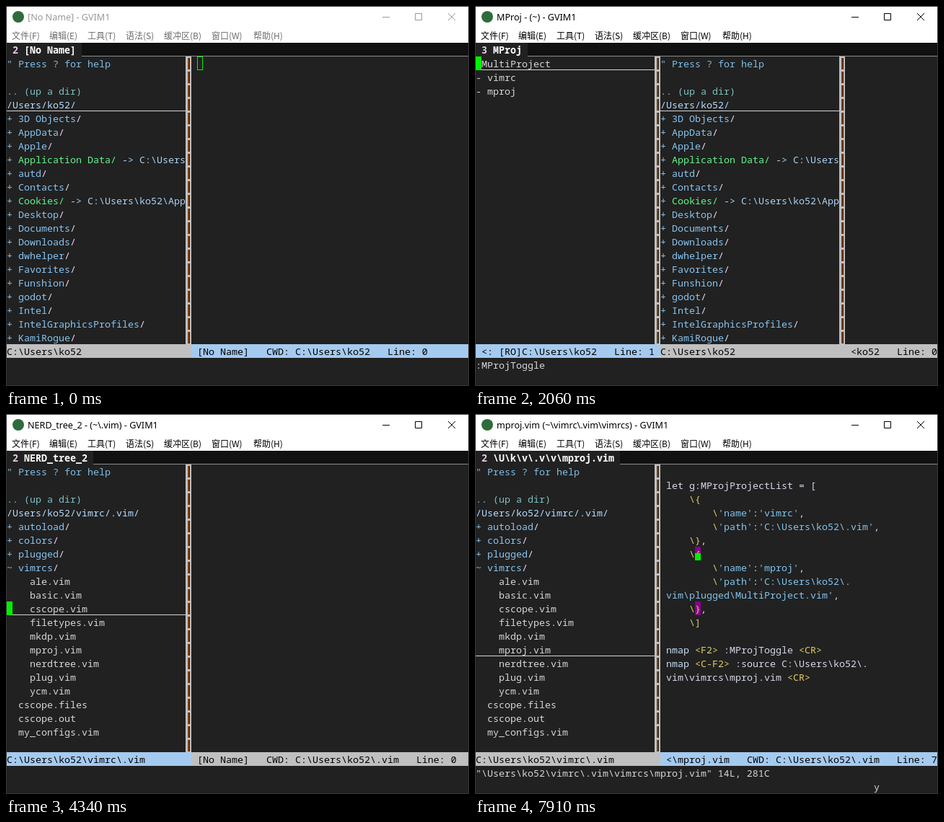
Recreate the animation shown at these times as an HTML page. Size 642 by 527 pixels, loop 8 s.

```html
<!DOCTYPE html>
<html lang="zh-CN">
<head>
<meta charset="utf-8">
<title>Editor session</title>
<style>
html, body { margin: 0; width: 100%; height: 100%; overflow: hidden; }
#win { position: absolute; left: 0; top: 0; width: 642px; height: 527px; background: #212121; overflow: hidden; }
#win::after { content: ""; position: absolute; inset: 0; border: 1px solid #3a3a3a; }
#bar { position: absolute; left: 0; top: 0; width: 642px; height: 51px; background: #fff; color: #000; }
#bar.idle { color: #999; }
#bar.idle .menu { color: #6d6d6d; }
#bar span { position: absolute; white-space: pre; }
#icon { position: absolute; left: 9px; top: 7px; width: 16px; height: 16px; border-radius: 50%; background: #2f6b3c; }
#title { left: 30px; top: 6px; font: 12.6px/20px "Noto Sans", sans-serif; }
.menu { top: 31px; font: 12px/20px "Noto Sans CJK SC", "Noto Sans CJK", sans-serif; }
#bar svg { position: absolute; left: 515px; top: 5px; fill: none; stroke: currentColor; }
#grid { position: absolute; left: 1px; top: 51px; width: 640px; height: 475px; overflow: hidden;
  font: 13.3333px/21px "Noto Sans Mono", "DejaVu Sans Mono", monospace; color: #d6d6d6; }
#grid span, #grid i { position: absolute; height: 19px; white-space: pre; }
#grid .fill { background: #111; box-shadow: inset 0 -1px #8c8c8c; }
#grid .tab { color: #fff; font-weight: bold; }
#grid .num { color: #e6c8e6; font-weight: bold; }
#grid .on { background: #a5caef; color: #000; }
#grid .off { background: #c0c0c0; color: #000; }
#grid .line { border-bottom: 1px solid #d6d6d6; height: 18px; }
#grid .sep { height: 399px; background: linear-gradient(90deg, #7d4300 2px, #212121 2px) 3px 0 / 3px 100% no-repeat, #c0c0c0; }
#grid .sep::after { content: ""; position: absolute; inset: 0;
  background: repeating-linear-gradient(#c0c0c0 0 2px, transparent 2px 18px, #c0c0c0 18px 19px); }
.help { color: #80bde6; }
.up { color: #7fc0c0; }
.root { color: #b6dcff; }
.dir { color: #87c5f2; }
.slash { color: #f0d8f4; }
.link { color: #62f58b; }
.dest { color: #a9d2f5; }
.str { color: #82c4ee; }
.key { color: #e3cc62; }
.cmd { color: #c6dcf8; }
.var { color: #d5d8ea; }
#grid .match { background: #87008b; color: #e3cc62; }
#grid .block { background: #00f000; color: #111; }
#grid .hollow { box-shadow: inset 0 0 0 1px #00f000; }
#grid .half { background: #87008b; color: #e3cc62; }
#grid .lower { background: linear-gradient(transparent 9px, #00f000 9px); }
#mouse { position: absolute; left: 0; top: 0; }
</style>
</head>
<body>
<div id="win">
  <div id="bar">
    <div id="icon"></div>
    <span id="title"></span>
    <svg width="120" height="22"><path d="M7 10.5h10M52.5 5.5h9v9h-9zM98 5l10 10M108 5l-10 10"/></svg>
  </div>
  <div id="grid"></div>
  <svg id="mouse" width="14" height="21"><path d="M.5 .5V16.5L4.2 13L6.7 18.8L9.2 17.7L6.7 12H11.6Z" fill="#fff" stroke="#111"/></svg>
</div>
<script>
const $ = id => document.getElementById(id);
const bar = $("bar"), grid = $("grid"), mouse = $("mouse");
const LOOP = 8000;
const HOME = "C:\\Users\\ko52", REPO = HOME + "\\vimrc\\.vim", CWD = HOME + "\\.vim";

[["文件(F)", 8], ["编辑(E)", 60], ["工具(T)", 113], ["语法(S)", 166],
 ["缓冲区(B)", 219], ["窗口(W)", 285], ["帮助(H)", 343]].forEach(([label, x]) => {
  const item = document.createElement("span");
  item.className = "menu";
  item.style.left = x + "px";
  item.textContent = label;
  bar.append(item);
});

const HELP = ['" Press ? for help', "", ".. (up a dir)"];
const homeTree = [...HELP, "/Users/ko52/",
  "+ 3D Objects/", "+ AppData/", "+ Apple/", "+ Application Data/ -> " + HOME, "+ autd/", "+ Contacts/",
  "+ Cookies/ -> " + HOME + "\\AppData", "+ Desktop/", "+ Documents/", "+ Downloads/", "+ dwhelper/",
  "+ Favorites/", "+ Funshion/", "+ godot/", "+ Intel/", "+ IntelGraphicsProfiles/", "+ KamiRogue/"];
const scripts = "ale basic cscope filetypes mkdp mproj nerdtree plug ycm".split(" ").map(n => `    ${n}.vim`);
const repoTree = open => [...HELP, "/Users/ko52/vimrc/.vim/", "+ autoload/", "+ colors/", "+ plugged/",
  (open ? "~" : "+") + " vimrcs/", ...(open ? scripts : []),
  "  cscope.files", "  cscope.out", "  my_configs.vim"];
const code = String.raw`
let g:MProjProjectList = [
    \{
        \'name':'vimrc',
        \'path':'C:\Users\ko52\.vim',
    \},
    \{
        \'name':'mproj',
        \'path':'C:\Users\ko52\.
vim\plugged\MultiProject.vim',
    \},
    \]

nmap <F2> :MProjToggle <CR>
nmap <C-F2> :source C:\Users\ko52\.
vim\vimrcs\mproj.vim <CR>`.split("\n");

let cells;
function box(row, col, width, cls, tag = "i") {
  const el = document.createElement(tag);
  el.className = cls;
  el.style.cssText = `left:${col * 8}px;top:${row * 19}px;` + (width ? `width:${width * 8}px` : "");
  grid.append(el);
  return el;
}
function put(row, col, text, cls = "", width = 0) {
  box(row, col, width, cls, "span").textContent = text;
  [...text].forEach((ch, i) => cells[row * 80 + col + i] = ch);
}
function runs(row, col, parts) {
  for (const [text, cls] of parts) {
    if (text) put(row, col, text, cls);
    col += text.length;
  }
}
const charAt = (row, col) => cells[row * 80 + col] || " ";
const status = (col, end, text, on) => put(22, col, text, on ? "on" : "off", end - col);
const separator = col => box(1, col, 1, "sep");

function treeParts(text) {
  const link = text.match(/^(. )(.*\/)( -> .*)$/);
  if (link) return [[link[1], "dir"], [link[2], "link"], [link[3].slice(0, 31 - link[1].length - link[2].length), "dest"]];
  if (/^[+~]/.test(text)) return [[text.slice(0, -1), "dir"], ["/", "slash"]];
  return [[text, { '"': "help", ".": "up", "/": "root" }[text[0]] || ""]];
}
function tree(lines, col, line) {
  box(line, col, 31, "line");
  lines.forEach((text, i) => runs(i + 1, col, treeParts(text)));
}
function codeParts(text) {
  const token = /(^vim[^']*'|'[^']*'?)|(<[^>]+>|^\s+\\[{}\]]?)|(^nmap)|([^'<]+?(?=<|'|$))/g;
  const names = ["str", "key", "cmd", "var"];
  return [...text.matchAll(token)].map(m => [m[0], names[m.slice(1).findIndex(g => g !== undefined)]]);
}

const views = {
  home() {
    tree(homeTree, 0, 4);
    separator(31);
    status(0, 32, HOME);
    status(32, 80, ` [No Name]   CWD: ${HOME}   Line: 0`, true);
  },
  projects({ line }) {
    box(line, 0, 31, "line");
    [" MultiProject", "- vimrc", "- mproj"].forEach((text, i) => put(i + 1, 0, text));
    tree(homeTree, 32, 4);
    separator(31);
    separator(63);
    status(0, 32, ` <: [RO]${HOME}   Line: ${line}`, true);
    status(32, 64, HOME);
    status(64, 80, " <ko52   Line: 0");
  },
  repo({ line, open, lnum }) {
    tree(repoTree(open), 0, line);
    separator(31);
    status(0, 32, REPO, !lnum);
    if (!lnum) return status(32, 80, ` [No Name]   CWD: ${CWD}   Line: 0`);
    code.forEach((text, i) => runs(i + 1, 33, codeParts(text)));
    status(32, 80, ` <${lnum < 10 ? "\\" : ""}mproj.vim   CWD: ${CWD}   Line: ${lnum}`, true);
  }
};

function paint(s) {
  cells = [];
  grid.textContent = "";
  bar.className = s.focus ? "" : "idle";
  $("title").textContent = s.title + " - GVIM1";
  const tabWidth = s.tab.length + 2;
  box(0, tabWidth, 80 - tabWidth, "fill");
  put(0, 1, s.tab[0], "num");
  put(0, 3, s.tab.slice(2), "tab");
  views[s.view](s);
  put(23, 0, s.cmd);
  if (s.keys) put(24, 69, s.keys);
  if (s.match) put(...s.match, charAt(...s.match), "match");
  if (s.cur) {
    const [row, col, shape = "block"] = s.cur;
    put(row, col, charAt(row, col), shape, 1);
    if (shape === "half") box(row, col, 1, "lower");
  }
}

const typed = text => ({ cmd: text, cur: [23, text.length] });
const pick = line => ({ line, cur: [line, 0] });
const edit = (row, col, lnum, match = null) => ({ cur: [row, col], lnum, match });
const opened = `"\\Users\\ko52\\vimrc\\.vim\\vimrcs\\mproj.vim" 14L, 281C`;

// Each step lists only what changes from the step before it.
const steps = [
  [0, { view: "home", title: "[No Name]", tab: "2 [No Name]", cmd: "", cur: [1, 33, "hollow"] }],
  [547, { focus: true, cur: [1, 33] }],
  [1300, typed(":")],
  [1420, typed(":M")],
  [1600, typed(":MP")],
  [1730, typed(":MPr")],
  [1930, typed(":MProjToggle")],
  [2060, { view: "projects", title: "MProj - (~)", tab: "3 MProj", ...pick(1) }],
  [2360, { cur: null }],
  [2540, pick(2)],
  [2790, { view: "repo", title: "NERD_tree_2 - (~\\.vim)", tab: "2 NERD_tree_2", cmd: "", ...pick(4) }],
  [3170, pick(6)],
  [3350, pick(7)],
  [3530, pick(8)],
  [3730, { open: true }],
  [4030, pick(9)],
  [4230, pick(10)],
  [4340, pick(11)],
  [4540, pick(12)],
  [4740, pick(13)],
  [4860, pick(14)],
  [5290, typed(opened)],
  [5360, { title: "mproj.vim (~\\vimrc\\.vim\\vimrcs)", tab: "2 \\U\\k\\v\\.v\\v\\mproj.vim", ...edit(16, 44, 14) }],
  [6040, edit(15, 44, 14)],
  [6170, edit(14, 44, 13)],
  [6350, edit(13, 33, 12)],
  [6530, edit(12, 38, 11, [2, 58])],
  [6710, edit(11, 39, 10)],
  [6890, edit(10, 44, 9)],
  [7020, edit(9, 44, 9)],
  [7220, edit(8, 44, 8)],
  [7350, edit(7, 38, 7, [11, 38])],
  [7910, { cur: [7, 38, "half"], keys: "y" }]
];
const states = [];
steps.forEach(([, change], i) => states.push({ ...states[i - 1], ...change }));

function moveMouse(t) {
  mouse.style.display = t >= 110 && t < 1170 ? "" : "none";
  const p = Math.min(1, (Math.floor((t - 110) / 62.5) + 1) / 7);
  const left = (1 - p) ** 2;
  mouse.style.transform = `translate(${Math.round(450 + 150 * left)}px, ${Math.round(293 + 245 * left)}px)`;
}

let shown = -1;
const start = performance.now();
function tick() {
  const t = (performance.now() - start) % LOOP;
  const now = steps.findLastIndex(([at]) => at <= t);
  if (now !== shown) paint(states[shown = now]);
  moveMouse(t);
  requestAnimationFrame(tick);
}
tick();
</script>
</body>
</html>
```
